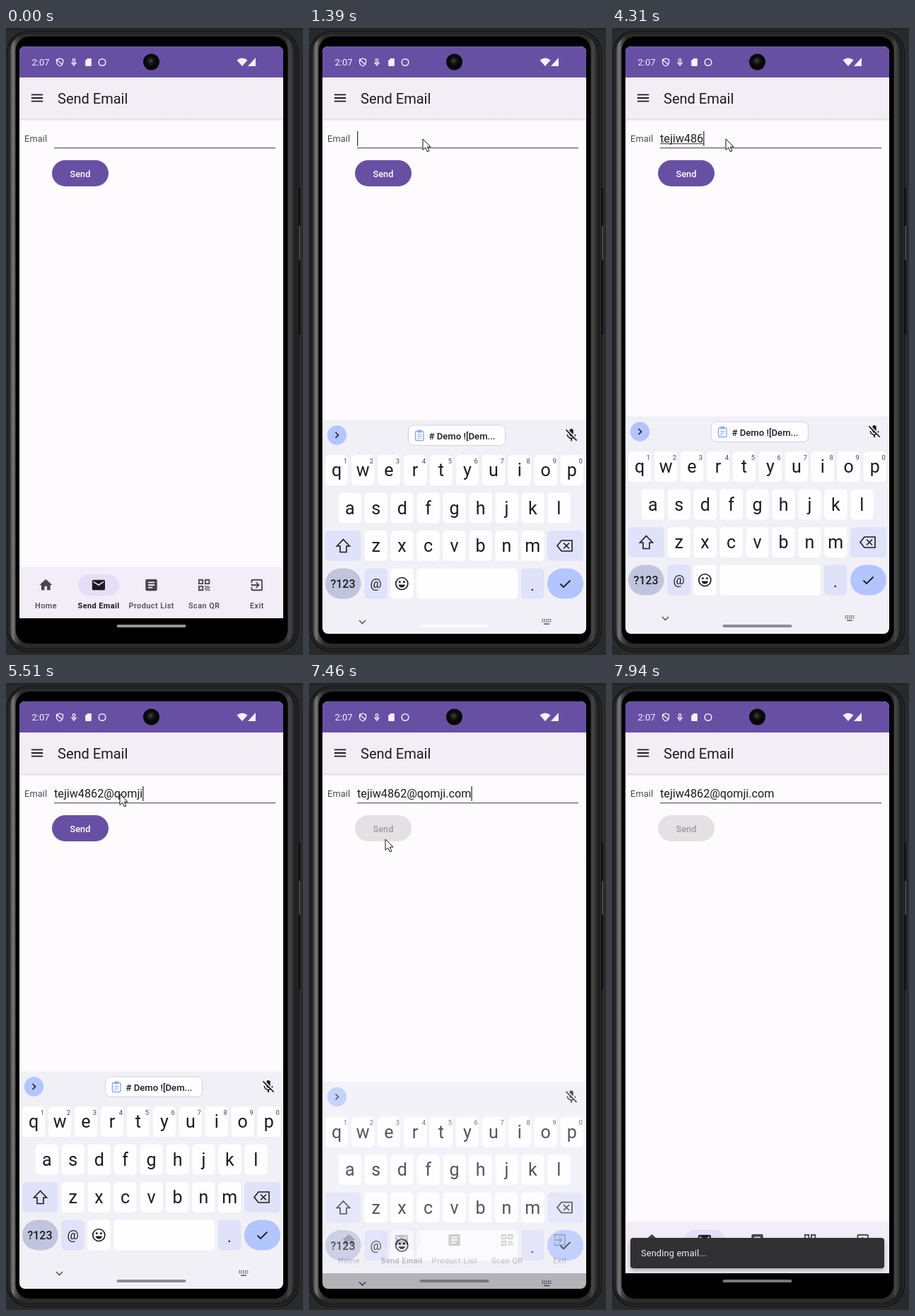
These frames come from a looping animation (420 px wide and 887 px high, 8000 ms). An HTML page:

```html
<!DOCTYPE html>
<html lang="en">
<head>
<meta charset="utf-8">
<title>Send Email</title>
<style>
html, body { margin: 0; width: 100%; height: 100%; overflow: hidden; background: #292a2c; }
svg { display: block; width: 100%; height: 100%; font-family: Roboto, sans-serif; }
text { white-space: pre; }
</style>
</head>
<body>
<svg id="stage" viewBox="0 0 420 887">
  <defs>
    <linearGradient id="rim" gradientUnits="userSpaceOnUse" x1="5" x2="407">
      <stop offset="0" stop-color="#2c2c2d"/><stop offset=".012" stop-color="#7a7a7c"/>
      <stop offset=".022" stop-color="#4a4a4c"/><stop offset=".04" stop-color="#2b2b2c"/>
      <stop offset=".97" stop-color="#2b2b2c"/><stop offset=".985" stop-color="#454547"/>
      <stop offset="1" stop-color="#2a2a2b"/>
    </linearGradient>
    <radialGradient id="lens" cx=".45" cy=".4">
      <stop offset="0" stop-color="#4a4a4a"/><stop offset=".4" stop-color="#1d1d1d"/>
      <stop offset="1" stop-color="#050505"/>
    </radialGradient>
    <linearGradient id="drop" x2="0" y2="1">
      <stop offset="0" stop-color="#000" stop-opacity=".13"/><stop offset="1" stop-color="#000" stop-opacity="0"/>
    </linearGradient>
    <clipPath id="screen"><rect x="19" y="26" width="373" height="831" rx="8"/></clipPath>
  </defs>
  <g id="phone"></g>
  <g clip-path="url(#screen)">
    <g id="app"></g>
    <g id="nav"></g>
    <g id="keyboard"></g>
    <g id="snackbar"></g>
    <rect id="handle" x="156.500" y="844" width="98" height="4" rx="2"/>
  </g>
  <path id="mouse" d="M.5.5v15.500l3.700-3.400 2.600 5.900 2.600-1.100-2.600-5.800h4.700z" fill="#fff" stroke="#111"/>
</svg>
<script>
const LOOP = 8000;
const EMAIL = 'tejiw4862@qomji.com';
const KEY_TIMES = [2830, 2960, 3230, 3430, 3630, 3980, 4040, 4310, 4510, 4780,
  4980, 5050, 5250, 5310, 5510, 5710, 5920, 6020, 6120];
const $ = id => document.getElementById(id);

const rect = (x, y, w, h, r, fill, more = '') =>
  `<rect x="${x}" y="${y}" width="${w}" height="${h}" rx="${r}" fill="${fill}" ${more}/>`;
const circle = (x, y, r, fill, more = '') => `<circle cx="${x}" cy="${y}" r="${r}" fill="${fill}" ${more}/>`;
const label = (s, x, y, size, fill, more = '') =>
  `<text x="${x}" y="${y}" font-size="${size}" fill="${fill}" ${more}>${s}</text>`;
const MID = 'text-anchor="middle"';
const line = (d, stroke, width = 1.6) =>
  `<path d="${d}" fill="none" stroke="${stroke}" stroke-width="${width}"/>`;
// 24-unit icon centred on a point
const icon = (d, x, y, size, fill) =>
  `<path transform="translate(${x - size / 2} ${y - size / 2}) scale(${size / 24})" fill="${fill}" d="${d}"/>`;

const ICONS = {
  menu: 'M3 18h18v-2H3zM3 13h18v-2H3zM3 6v2h18V6z',
  home: 'M10 20v-6h4v6h5v-8h3L12 3 2 12h3v8z',
  mail: 'M20 4H4c-1.100 0-2 .9-2 2v12c0 1.100.9 2 2 2h16c1.100 0 2-.9 2-2V6c0-1.100-.9-2-2-2zm0 4l-8 5-8-5V6l8 5 8-5z',
  list: 'M19 3H5c-1.100 0-2 .9-2 2v14c0 1.100.9 2 2 2h14c1.100 0 2-.9 2-2V5c0-1.100-.9-2-2-2zm-5 14H7v-2h7zm3-4H7v-2h10zm0-4H7V7h10z',
  scan: 'M3 11h8V3H3zm2-6h4v4H5zM3 21h8v-8H3zm2-6h4v4H5zM13 3v8h8V3zm6 6h-4V5h4z' +
    'M13 13h2v2h2v2h-2v2h-2v-2h2v-2h-2zM17 13h2v2h2v2h-2v-2h-2zM17 17h2v2h2v2h-2v-2h-2zM15 19h2v2h-2z',
  exit: 'M10.100 15.600L11.500 17l5-5-5-5-1.400 1.400L12.700 11H3v2h9.700zM19 3H5c-1.100 0-2 .9-2 2v4h2V5h14v14H5v-4H3v4c0 1.100.9 2 2 2h14c1.100 0 2-.9 2-2V5c0-1.100-.9-2-2-2z',
  card: 'M18 2h-8L4 8v12c0 1.100.9 2 2 2h12c1.100 0 2-.9 2-2V4c0-1.100-.9-2-2-2z',
  micOff: 'M19 11h-1.700c0 .7-.2 1.400-.4 2l1.200 1.300c.6-1 .9-2.100.9-3.300zm-4 .2V5a3 3 0 0 0-6 0v.2zM4.300 3L3 4.300l6 6v.7c0 1.700 1.300 3 3 3l.7-.1 1.600 1.700c-.7.3-1.500.5-2.300.5-2.800 0-5.300-2.100-5.300-5.100H5c0 3.400 2.700 6.200 6 6.700V21h2v-3.300c.9-.1 1.800-.4 2.500-.9l4.200 4.200 1.300-1.300z'
};

$('phone').innerHTML =
  rect(0, 0, 420, 3, 0, '#232426') +
  rect(413, 226, 3, 54, 1, '#111') + rect(414, 280, 2, 48, 0, '#48484a') + rect(413, 328, 3, 106, 1, '#111') +
  rect(1, 4, 413, 879, 31, '#0d0d0e') +
  rect(2.5, 5.5, 410, 876, 30, '#1f1f20', 'stroke="#303032"') +
  rect(5, 8, 402, 869, 27, 'url(#rim)') +
  rect(13.5, 12, 385, 859, 20, '#000');

const WHITE = '#f6f0fb', INK = '#1d1b20', MUTED = '#49454f';
$('app').innerHTML =
  rect(19, 26, 373, 809, 0, '#fefbff') +
  rect(19, 128, 373, 4, 0, 'url(#drop)') +
  rect(19, 70, 373, 58, 0, '#f3eef5') +
  rect(19, 26, 373, 44, 0, '#6750a4') +
  label('2:07', 36.5, 53, 13, WHITE) +
  line('M76 43l4.500 1.800v3.200q0 4-4.500 6-4.500-2-4.500-6v-3.200zM72 45l8 7', WHITE, 1.3) +
  circle(96, 45.5, 1.8, 'none', `stroke="${WHITE}" stroke-width="1.200"`) +
  line('M92.500 48.500l3.500 4.500 3.500-4.500M94 49.500h4', WHITE, 1.3) +
  icon(ICONS.card, 116.5, 48.5, 13, WHITE) +
  circle(136, 48.5, 4.8, 'none', `stroke="${WHITE}" stroke-width="1.500"`) +
  `<path d="M326.500 45.500q7.500-6 15 0l-7.500 8.500zM353 42v12h-11z" fill="${WHITE}"/>` +
  circle(205.5, 48, 11.5, '#080808') + circle(205.5, 48, 8, 'url(#lens)') +
  icon(ICONS.menu, 44, 99, 21.8, INK) +
  label('Send Email', 73, 107, 20, INK) +
  label('Email', 26, 161, 12.7, MUTED, 'letter-spacing=".2"') +
  rect(68, 169, 313, 1.3, 0, '#66636a') +
  label('', 68, 162, 16.2, INK, 'id="field"') +
  rect(68, 163.2, 0, 1, 0, '#333', 'id="composing"') +
  rect(68, 146, 1.3, 21, 0, '#39373c', 'id="caret"') +
  rect(65, 187, 80, 37, 18.5, '#6750a4', 'id="button"') +
  label('Send', 105, 210.5, 12.7, '#fff', `id="buttonText" font-weight="500" letter-spacing=".1" ${MID}`);

const TABS = [['Home', 'home'], ['Send Email', 'mail'], ['Product List', 'list'], ['Scan QR', 'scan'], ['Exit', 'exit']];
$('nav').innerHTML =
  rect(19, 762.5, 373, 72.5, 0, '#f2edf6') +
  rect(19, 835, 373, 22, 0, '#000') +
  rect(102, 773.5, 58, 29.5, 14.7, '#e6def6') +
  TABS.map(([name, glyph], i) => {
    const x = 56.3 + 74.6 * i, active = i === 1;
    return icon(ICONS[glyph], x, 788, 21.8, active ? INK : MUTED) +
      label(name, x + .2, 821, 10.9, active ? INK : MUTED,
        `font-weight="${active ? 700 : 500}" letter-spacing=".45" ${MID}`);
  }).join('');

const KEY_INK = '#1b1b21', SOFT = '#dfe2f9', BLUE = '#b3c5ff';
const key = (x, y, w, fill = '#fefeff', r = 5.5) => rect(x, y, w, 43, r, fill);
const keyRow = (letters, x, y) => [...letters].map((c, i) => {
  const left = x + 36.95 * i;
  return key(left, y, 32.3) + label(c, left + 16.1, y + 30, 25, KEY_INK, MID);
}).join('');

function drawKeyboard() {
  const digits = [...'1234567890'].map((d, i) =>
    label(d, 51.5 + 36.95 * i, 610.5, 9.5, '#45464f', MID)).join('');
  const dots = [0, 1, 2, 3, 4].map(i => [0, 1].map(j =>
    rect(329.5 + 2.8 * i, 831 + 2.8 * j, 1.6, 1.6, 0, '#55565e')).join('')).join('');
  return rect(19, 549.5, 373, 310, 0, '#f1f0f7') +
    circle(39.5, 571, 13.7, BLUE) + line('M37.500 567l4 4-4 4', KEY_INK) +
    '<g id="chip">' + rect(140.5, 557, 137, 28.5, 7, '#fefeff', 'stroke="#d2d2da"') +
    rect(150.5, 565.5, 11.5, 13, 1.5, 'none', 'stroke="#8fa9ee" stroke-width="1.400"') +
    rect(153.5, 563.5, 5.5, 4, 1, '#8fa9ee') + line('M153 570.500h6.500M153 573h6.500M153 575.500h4', '#8fa9ee', 1) +
    label('# Demo ![Dem...', 169.5, 576.5, 13.1, KEY_INK, 'font-weight="500"') + '</g>' +
    icon(ICONS.micOff, 371, 571, 21.8, KEY_INK) +
    keyRow('qwertyuiop', 23, 599) + digits +
    keyRow('asdfghjkl', 41.7, 652.5) +
    key(23, 706, 50.5, SOFT) + line('M48.500 718.500l9 9.500h-4.500v8.500h-9v-8.500h-4.500z', KEY_INK) +
    keyRow('zxcvbnm', 78.5, 706) +
    key(337, 706, 51, SOFT) + line('M357 720h15v15h-15l-6-7.500zM360 723.500l8 8M368 723.500l-8 8', KEY_INK) +
    key(23, 759.5, 50.5, '#c0c5dd', 21.5) + label('?123', 48, 787, 16, KEY_INK, `font-weight="500" ${MID}`) +
    key(78.5, 759.5, 32.3, SOFT) + label('@', 94.5, 787, 18, KEY_INK, MID) +
    key(115.3, 759.5, 32.3) + circle(131.3, 781, 8.5, 'none', `stroke="${KEY_INK}" stroke-width="1.700"`) +
    circle(128.3, 778.5, 1.5, KEY_INK) + circle(134.3, 778.5, 1.5, KEY_INK) +
    `<path d="M126.500 782.500h9.600q-1.300 4-4.800 4t-4.800-4z" fill="${KEY_INK}"/>` +
    key(152.2, 759.5, 143) +
    key(300, 759.5, 32.3, SOFT) + label('.', 316, 791, 22, KEY_INK, MID) +
    key(337, 759.5, 51, BLUE, 21.5) + line('M355.500 781.500l4.500 4.500 9.500-9.500', KEY_INK, 1.8) +
    line('M71 833l4.500 4.500 4.500-4.500', '#45464f', 1.4) + dots + rect(332, 837.3, 8, 1.5, 0, '#55565e');
}
$('keyboard').innerHTML = drawKeyboard();

$('snackbar').innerHTML =
  rect(26, 785, 359, 43, 4, '#313033', 'style="filter:drop-shadow(0 3px 3px rgba(0,0,0,.3))"') +
  label('Sending email...', 41, 811, 12.7, '#f4eff4', 'letter-spacing=".2"');

// Tables of [time, value...]; a row holds until the next one.
const KEYBOARD = [[0, 310, 0], [1260, 225, .14], [1320, 62, .75], [1390, 5, 1], [1460, 0, 1],
  [7460, 14.5, .74], [7530, 50, .4], [7600, 105, .12], [7660, 310, 0]];
const HANDLE = [[0, '#939393'], [1390, '#f9f9fc'], [1650, '#a2a2a6'], [2070, '#96969a'],
  [2630, '#8e8e92'], [7460, '#77777a']];
const CARET = [[0, 0], [920, 1], [1260, 0], [1320, 1], [1800, 0], [2290, 1], [6650, 0], [7120, 1], [7660, 0]];
const SNACKBAR = [[0, 0], [7800, .35], [7870, .8], [7940, 1]];
const at = (table, t) => table.findLast(row => row[0] <= t).slice(1);

const smooth = p => p * p * (3 - 2 * p);
function glide(t, start, end, steps, from, to) {
  const p = Math.min(1, Math.max(0, Math.floor((t - start) / (end - start) * steps) / steps));
  return from.map((v, i) => v + (to[i] - v) * smooth(p));
}
const mouseAt = t => t < 6720
  ? glide(t, 120, 853, 11, [366, 868], [160.5, 156.5])
  : glide(t, 6720, 7400, 10, [160.5, 156.5], [107.5, 220.5]);

const show = (id, on) => $(id).setAttribute('opacity', +on);

function render(t) {
  const typed = KEY_TIMES.filter(k => k <= t).length;
  const field = $('field');
  field.textContent = EMAIL.slice(0, typed);
  const width = typed ? field.getComputedTextLength() : 0;
  $('caret').setAttribute('x', 68 + width);
  show('caret', at(CARET, t)[0]);

  const marked = t >= 3630 && t < 3840 ? 4 : typed;
  const composing = marked && t < 4510 ? field.getSubStringLength(0, marked) : 0;
  $('composing').setAttribute('width', composing);

  const [offset, alpha] = at(KEYBOARD, t);
  $('keyboard').setAttribute('transform', `translate(0 ${offset})`);
  show('keyboard', alpha);
  show('chip', t >= 1320 && t < 6900);
  $('handle').setAttribute('fill', at(HANDLE, t)[0]);

  const sent = t >= 7460;
  $('button').setAttribute('fill', sent ? '#e4e0e4' : '#6750a4');
  $('buttonText').setAttribute('fill', sent ? '#9d999f' : '#fff');
  show('snackbar', at(SNACKBAR, t)[0]);

  $('mouse').setAttribute('transform', `translate(${mouseAt(t)})`);
  show('mouse', t >= 120 && t < 7870);
}

const start = performance.now();
function tick() {
  render((performance.now() - start) % LOOP);
  requestAnimationFrame(tick);
}
tick();
</script>
</body>
</html>
```
